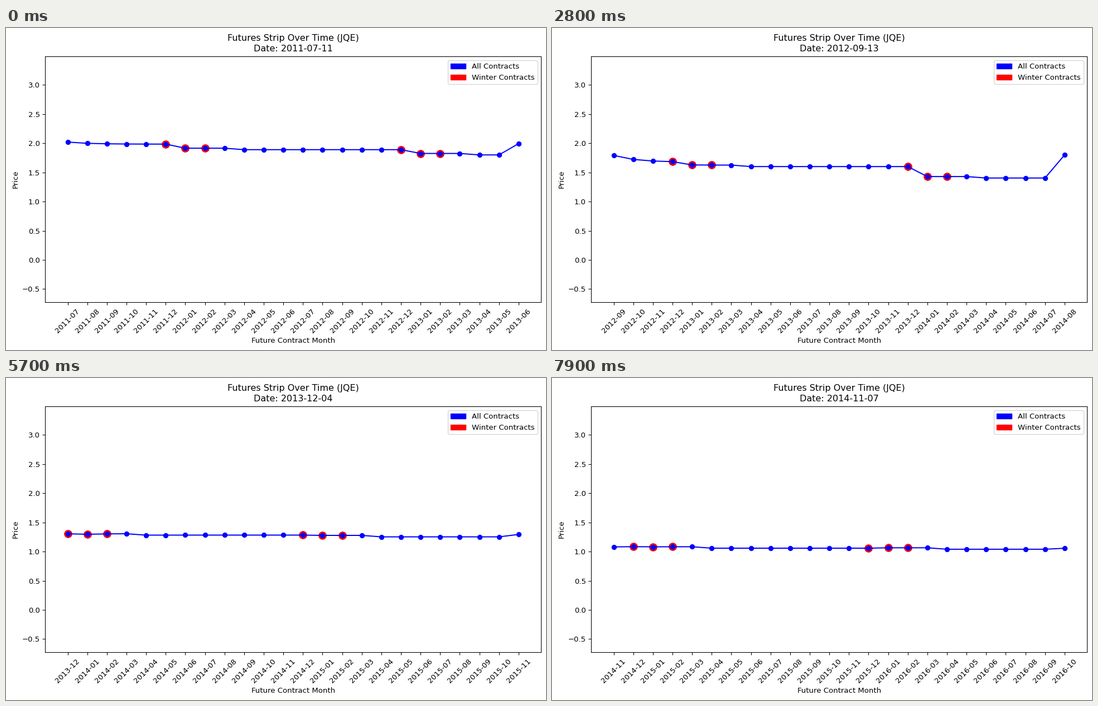
A matplotlib script that plays this animation: 968x579 px, repeating every 8000 ms.

```python
import numpy as np
import matplotlib.pyplot as plt
from matplotlib.animation import FuncAnimation
from matplotlib.patches import Patch

W, H, DPI = 968, 579, 96
FRAMES, STEP_MS, STEP_DAYS = 80, 100, 11
N = 24
START = np.datetime64("2011-07-11")
LEFT, RIGHT, TOP, BOTTOM = 70.2, 959.3, 51.2, 493.1

# Market levels over time, interpolated between a few steps
STEPS = [0, 10, 21, 36, 48, 66, 79]
SPOT = [2.02, 2.42, 1.81, 1.77, 1.31, 1.30, 1.08]
THIS_YEAR = [1.985, 1.86, 1.697, 1.655, 1.355, 1.31, 1.087]
NEXT_YEAR = [1.89, 1.835, 1.60, 1.60, 1.315, 1.25, 1.058]
TAIL = [1.80, 1.815, 1.46, 1.34, 1.28, 1.225, 1.04]
LAST = [1.994, 1.82, 1.80, 1.80, 1.348, 1.239, 1.057]

DECAY = 2.5         # how fast the spot premium fades per month
WINTER_LIFT = 0.025  # January to March

plt.rcParams.update({"font.family": "DejaVu Sans", "font.size": 9.97})
x = np.arange(N)


def trade_date(i):
    return np.busday_offset(START, STEP_DAYS * i, roll="forward")


def contracts(i):
    return trade_date(i).astype("datetime64[M]") + x


def strip(i):
    """Calendar-year levels, a fading spot premium and a fixed last contract."""
    spot, *levels, last = (np.interp(i, STEPS, row) for row in
                           (SPOT, THIS_YEAR, NEXT_YEAR, TAIL, LAST))
    months = contracts(i).astype(int)
    years = months // 12 - months[0] // 12
    band = np.where(x >= N - 4, 2, np.minimum(years, 2))
    prices = np.array(levels)[band] + WINTER_LIFT * (months % 12 < 3)
    prices += (spot - prices[0]) * DECAY ** -x.astype(float)
    prices[-1] = last
    return prices


fig = plt.figure(figsize=(W / DPI, H / DPI), dpi=DPI)
ax = fig.add_axes([LEFT / W, 1 - BOTTOM / H,
                   (RIGHT - LEFT) / W, (BOTTOM - TOP) / H])
line, = ax.plot(x, strip(0), "o-", color="blue")
winter = ax.scatter([], [], s=100, color="red", zorder=1)
ax.set_xlim(-0.05 * (N - 1), 1.05 * (N - 1))
ax.set_ylim(-0.726, 3.488)
ax.set_yticks(np.arange(-0.5, 3.1, 0.5))
ax.set_xticks(x)
ax.tick_params(axis="x", rotation=45)
ax.set_xlabel("Future Contract Month")
ax.set_ylabel("Price")
ax.legend(handles=[Patch(color="blue", label="All Contracts"),
                   Patch(color="red", label="Winter Contracts")],
          loc="upper right")


def update(i):
    months, prices = contracts(i), strip(i)
    cold = np.isin(months.astype(int) % 12, [11, 0, 1])
    line.set_ydata(prices)
    winter.set_offsets(np.column_stack([x[cold], prices[cold]]))
    ax.set_xticklabels([str(m) for m in months])
    ax.set_title(f"Futures Strip Over Time (JQE)\nDate: {trade_date(i)}",
                 linespacing=1.35, pad=7)
    return line, winter


anim = FuncAnimation(fig, update, frames=FRAMES, interval=STEP_MS,
                     init_func=lambda: update(0), repeat=True, repeat_delay=0)
plt.show()
```
